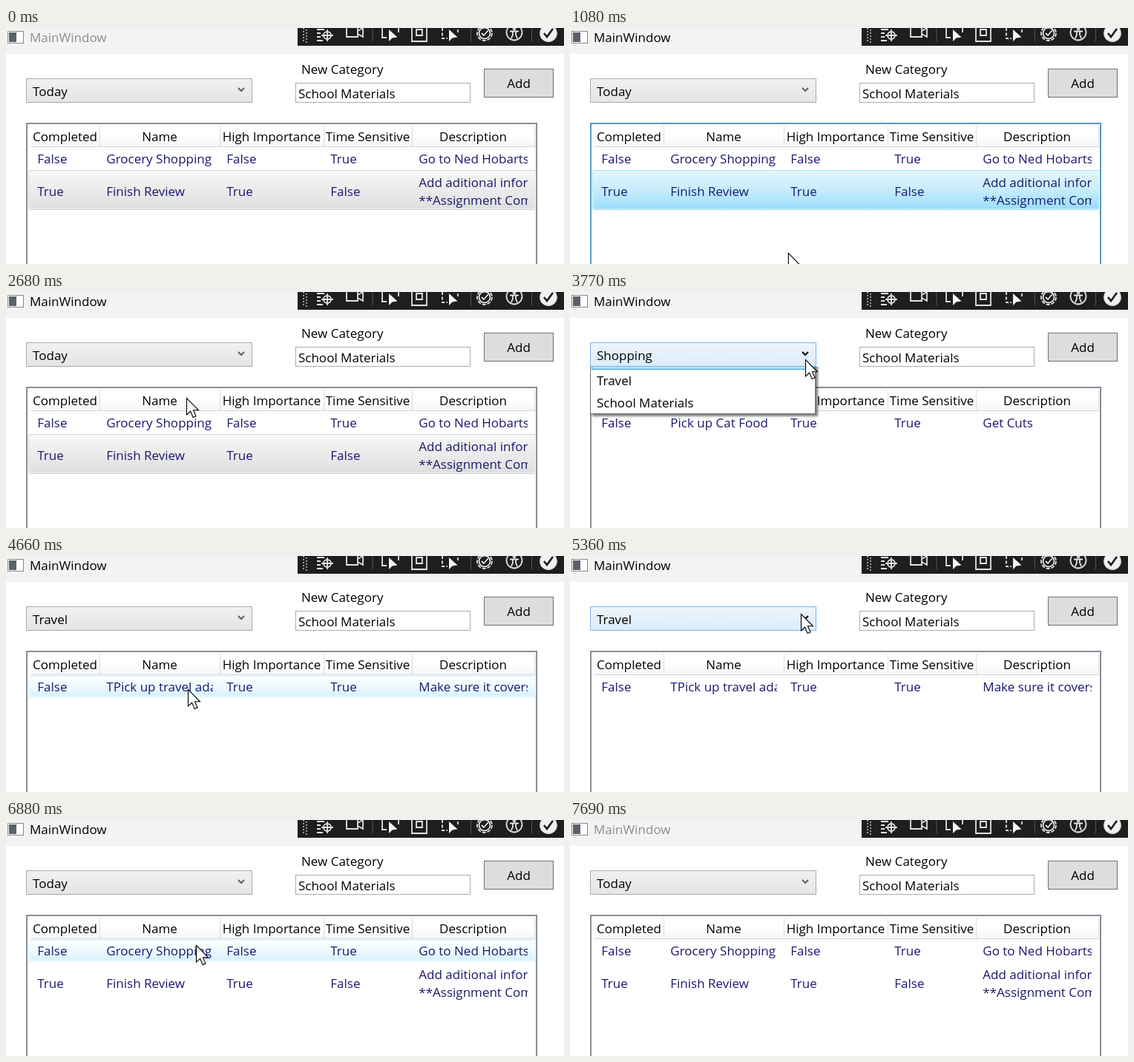
An HTML page for the animation above (7820 ms loop, 752 by 319 pixels).

```html
<!DOCTYPE html>
<html lang="en">
<head>
<meta charset="utf-8">
<title>Task list</title>
<style>
html, body { margin: 0; width: 100%; height: 100%; overflow: hidden; background: #fff; }
svg { display: block; width: 752px; height: 319px; }
text { font: 17px "Open Sans", "Noto Sans", sans-serif; white-space: pre; }
.mid { text-anchor: middle; }
.cell { fill: #191970; }
.menu { filter: drop-shadow(3px 3px 1.5px rgba(0, 0, 0, .5)); }
</style>
</head>
<body>
<svg viewBox="0 0 752 319" xmlns="http://www.w3.org/2000/svg">
  <defs>
    <clipPath id="list"><rect x="28" y="130" width="685" height="200"/></clipPath>
    <clipPath id="name"><rect x="130" y="130" width="149" height="200"/></clipPath>
    <clipPath id="desc"><rect x="550" y="130" width="153" height="200"/></clipPath>
    <clipPath id="drop"><rect x="20" y="101" width="330" height="140"/></clipPath>
  </defs>
  <g id="stage"></g>
</svg>
<script>
const LOOP = 7820, STEP = LOOP / 102;
const ENTER = 920, LEAVE = 7430, FOCUS = 990, BLUR = 7660;
const stage = document.getElementById('stage');

const CATEGORIES = ['Today', 'Shopping', 'Travel', 'School Materials'];
const TASKS = [
  [['False', 'Grocery Shopping', 'False', 'True', 'Go to Ned Hobarts'],
   ['True', 'Finish Review', 'True', 'False', 'Add aditional information\n**Assignment Completed']],
  [['False', 'Pick up Cat Food', 'True', 'True', 'Get Cuts']],
  [['False', 'TPick up travel adapter', 'True', 'True', 'Make sure it covers all']]
];
const HEADS = ['Completed', 'Name', 'High Importance', 'Time Sensitive', 'Description'];
const EDGES = [33, 126, 288, 428, 547, 712];
const CLIPS = { 1: 'name', 4: 'desc' };

// Each use of the drop-down list
const VISITS = [
  { press: 1835, open: 1905, close: 2680, pick: 1 },
  { press: 3600, open: 3678, close: 4590, pick: 2 },
  { press: 5590, open: 5740, close: 6640, pick: 0 }
];
// Pointer moves: start, end, x, y
const MOVES = [
  [0, 0, 292, 330], [920, 1690, 310, 77], [1910, 2300, 243, 143], [2680, 3150, 317, 91],
  [3830, 4140, 245, 180], [4750, 5360, 311, 78], [5750, 6060, 262, 116], [6640, 7440, 238, 330]
];

const text = (x, y, s, more = '') => `<text x="${x}" y="${y}" ${more}>${s}</text>`;
const rect = (x, y, w, h, fill, stroke = 'none', more = '') =>
  `<rect x="${x}" y="${y}" width="${w}" height="${h}" fill="${fill}" stroke="${stroke}" ${more}/>`;
const path = (d, more = '') => `<path d="${d}" ${more}/>`;
const circle = (x, y, r, more = '') => `<circle cx="${x}" cy="${y}" r="${r}" ${more}/>`;

// Vertical gradients
const SHADES = {
  combo: ['#f0f0f0', '#e5e5e5'],
  comboHot: ['#ecf4fc', '#dcecfc'],
  rowGray: ['#f7f7f7', '#ebebeb', '#dedede'],
  rowBlue: ['#e2f6fe', '#c6ecfd', '#9bddfb'],
  rowHot: ['#ffffff', '#eefaff', '#d5f1fd'],
  head: ['#ffffff', '#ffffff', '#f5f6f8'],
  headHot: ['#f2fbff', '#e8f8ff', '#d5f1fd']
};
const EDGE_COLOR = { rowGray: '#cfcfcf', rowBlue: '#98ddfb', rowHot: '#d5f1fd' };
document.querySelector('defs').insertAdjacentHTML('beforeend', Object.entries(SHADES).map(([id, list]) =>
  `<linearGradient id="${id}" x2="0" y2="1">${list.map((c, i) =>
    `<stop offset="${i / (list.length - 1)}" stop-color="${c}"/>`).join('')}</linearGradient>`).join(''));

function toolbar() {
  const arrow = x => path(`M${x} 2v16l4.5-4.5 7-1z`, 'fill="#f4f4f4" stroke="none"');
  const grip = [0, 1, 2, 3, 4].map(i => `M400 ${i * 4 + 1}h2M404 ${i * 4 + 3}h2`).join('');
  return rect(393, 0, 359, 24, '#1e1e1e') +
    '<g fill="none" stroke="#e4e4e4" stroke-width="1.8">' +
    path(grip, 'stroke="#999"') +
    path('M419 2h10M419 7h5M419 12h5M419 17h8') +
    circle(433, 10, 5) + path('M433 2v16M425 10h16') +
    path('M459 0v12h15V0M474 4l7-4v12l-7-4') +
    path('M494 0v18M626.5 0v18M708.5 0v18', 'stroke="#555" stroke-width="1"') +
    path('M507 0v13h6M529 6V0') + arrow(516) +
    path('M547 0v18h20V0M553 2h8v8h-8z') +
    path('M588 0v14h7M609 6V0', 'stroke-dasharray="4 2.5"') + arrow(597) +
    circle(645, 7, 10, 'stroke-dasharray="5 2"') + circle(645, 7, 7.5) + path('M641 7l3 3 6-7') +
    circle(685, 6, 10.5) + circle(685, 1, 1.4) + path('M679 4.5h12M683 5v4l-2 5M687 5v4l2 5') +
    circle(731, 7, 11, 'fill="#f2f2f2"') + path('M725 7l4 5 8-11', 'stroke="#1e1e1e" stroke-width="2.6"') +
    '</g>';
}

const FIXED = rect(0, 0, 752, 319, '#fff') + rect(0, 0, 752, 35, '#f3f3f3') +
  rect(2.5, 4.5, 21, 16, '#fff', '#888') + rect(4, 6, 10, 13, '#5b626b') + toolbar() +
  text(398, 62, 'New Category') +
  rect(390.5, 74.5, 235, 26, '#fff', '#abadb3') + text(394, 95, 'School Materials') +
  rect(644.5, 55.5, 93, 38, '#ddd', '#707070') + text(691, 81, 'Add', 'class="mid"');

function pointer(t) {
  if (t < ENTER || t >= LEAVE) return null;
  const i = MOVES.findLastIndex(m => m[0] <= t);
  const [, , x0, y0] = MOVES[i - 1], [a, b, x, y] = MOVES[i];
  const u = Math.min(1, (t - a) / (b - a)), k = u * u * (3 - 2 * u);
  return { x: x0 + (x - x0) * k, y: y0 + (y - y0) * k };
}

const inside = (p, x, y, w, h) => p && p.x >= x && p.x < x + w && p.y >= y && p.y < y + h;

function combo(name, hot) {
  return rect(27.5, 68.5, 304, 32, `url(#combo${hot ? 'Hot' : ''})`, hot ? '#7eb4ea' : '#acacac') +
    text(36, 92, name) +
    path('M313 81l4 4 4-4', `fill="none" stroke="${hot ? '#000' : '#606060'}" stroke-width="2"`);
}

function header(p) {
  const cells = HEADS.map((h, i) => {
    const x = EDGES[i], w = EDGES[i + 1] - x;
    return rect(x + 1, 132, w - 1, 28, `url(#head${inside(p, x, 132, w, 29) ? 'Hot' : ''})`) +
      path(`M${x + w + .5} 132v28`, 'stroke="#d8dce1"') + text(x + w / 2, 153, h, 'class="mid"');
  });
  return cells.join('') + path('M33 160.5h680', 'stroke="#d5d5d5"');
}

function taskRow(row, r, look, y, h) {
  let out = '';
  if (look) {
    out += rect(30.5, y + .5, 760, h - 1, `url(#${look})`, EDGE_COLOR[look], 'rx="3"') +
      rect(31.5, y + 1.5, 758, h - 3, 'none', '#fff', 'rx="2" opacity=".5"');
  }
  row.forEach((value, c) => {
    const lines = value.split('\n'), base = 183 + r * 44 - (lines.length - 1) * 12;
    const clip = CLIPS[c] ? `clip-path="url(#${CLIPS[c]})"` : '';
    lines.forEach((s, n) => { out += text(EDGES[c] + 9.3, base + n * 24, s, `class="cell" ${clip}`); });
  });
  return out;
}

function table(t, category, first, p) {
  const focused = t >= FOCUS && t < VISITS[0].press;
  const rows = TASKS[category].map((row, r) => {
    const y = r ? 192 : 162, h = r ? 54 : 29;
    const look = first && r ? (focused ? 'rowBlue' : 'rowGray') : inside(p, 30, y, 683, h) ? 'rowHot' : '';
    return taskRow(row, r, look, y, h);
  });
  return rect(28, 129, 687, 220, '#fff', focused ? '#5a97c4' : '#8a8c96', 'stroke-width="2"') +
    `<g clip-path="url(#list)">${header(p)}${rows.join('')}</g>`;
}

function menu(open, selected, p) {
  const over = CATEGORIES.findIndex((_, i) => open === 1 && inside(p, 28, 103 + i * 30, 302, 30));
  const active = over < 0 ? selected : over;
  const items = CATEGORIES.map((s, i) => {
    const y = 103 + i * 30;
    const box = i === active ? rect(29.5, y + .5, 300, 29, '#b9e0f2', '#26a0da')
      : i === selected ? rect(29.5, y + .5, 300, 29, '#f4f4f4', '#dadada') : '';
    return box + text(36, y + 21, s);
  }).join('');
  return `<g clip-path="url(#drop)"><g class="menu" transform="translate(0 ${(open - 1) * 122})">` +
    rect(27.5, 101.5, 303, 121, '#fff', '#707070') + items + '</g></g>';
}

function draw(t) {
  const p = pointer(t);
  const visit = VISITS.find(v => t >= v.open && t < v.close);
  const done = VISITS.findLast(v => t >= v.close + 60);
  const chosen = done ? done.pick : 0;
  // Hover waits until the chosen list has loaded
  const free = !VISITS.some(v => t >= v.open && t < v.close + 60);
  const clicked = VISITS.some(v => (t >= v.press && t < v.open) || (t >= v.close - 160 && t < v.close));
  const titleColor = t >= FOCUS && t < BLUR ? '#000' : '#8c8c8c';

  let out = FIXED + text(32, 19, 'MainWindow', `fill="${titleColor}"`) +
    table(t, chosen, !done, free ? p : null) + combo(CATEGORIES[chosen], inside(p, 27, 68, 305, 33));
  if (visit) out += menu(Math.min(1, (t - visit.open) / 150), chosen, p);
  if (p) {
    if (clicked) out += circle(p.x, p.y, 18, 'fill="#ff0" opacity=".47"');
    out += path('M.5 .5V23L5.6 18.3 9.2 26.6 13 25 9.5 16.8H16.5Z',
      `transform="translate(${p.x} ${p.y})" fill="#fff" stroke="#000" stroke-width="1.1"`);
  }
  stage.innerHTML = out;
}

// The screen refreshes in even steps
const begin = performance.now();
let shown = -1;
function frame() {
  const t = (performance.now() - begin) % LOOP;
  const tick = Math.floor((t + 25) / STEP) % 102;
  if (tick !== shown) draw((shown = tick) * STEP);
  requestAnimationFrame(frame);
}
frame();
</script>
</body>
</html>
```
